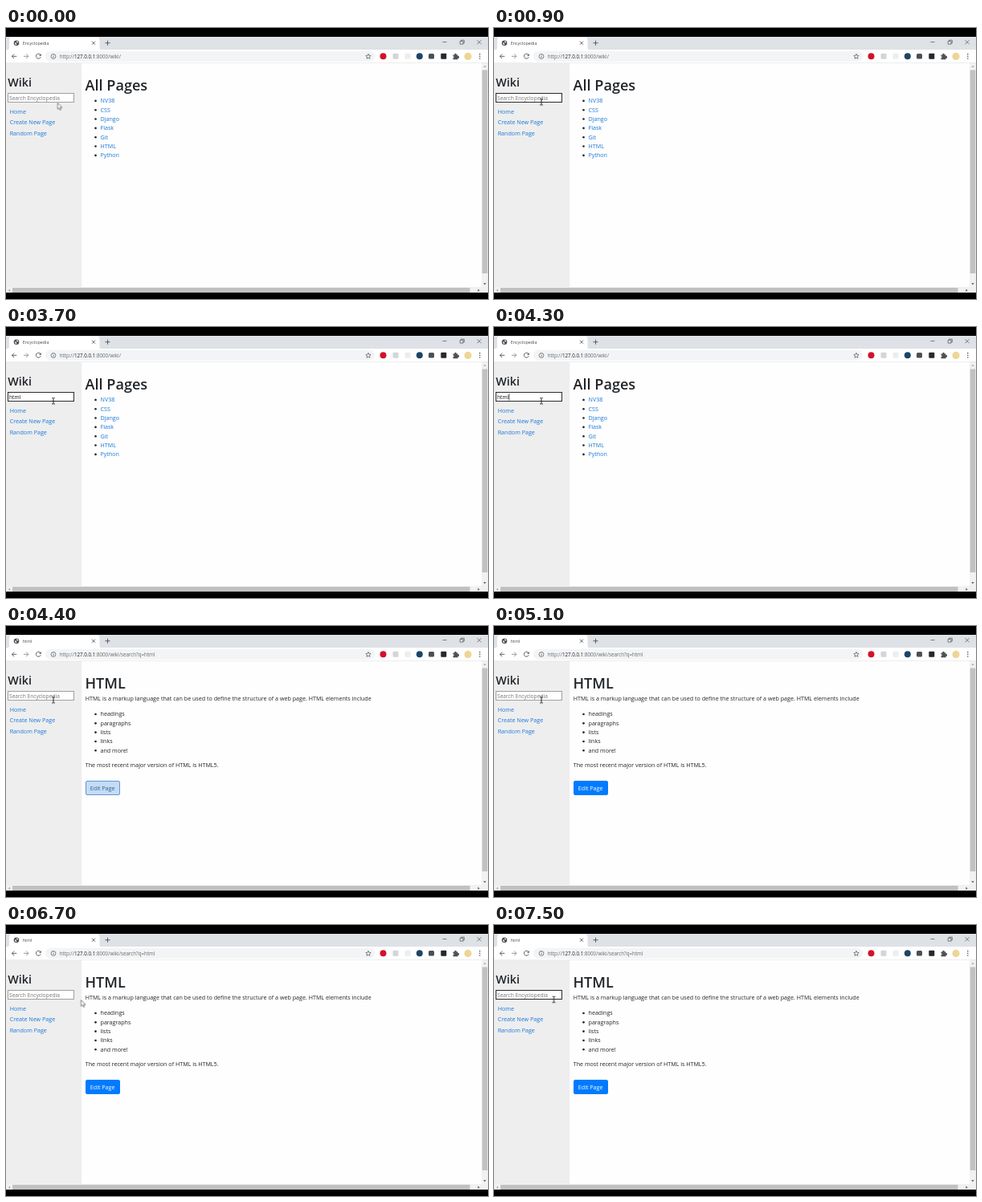
An HTML page that plays this animation: 600 by 338 pixels, repeating every 8000 ms.

```html
<!DOCTYPE html>
<html lang="en">
<head>
<meta charset="utf-8">
<title>Encyclopedia</title>
<style>
html, body { margin: 0; width: 100%; height: 100%; overflow: hidden; background: #000; }
svg { display: block; width: 600px; height: 338px; }
text { font: 7.15px "Open Sans", "Noto Sans", sans-serif; fill: #212529; white-space: pre; }
.h1 { font-size: 18.1px; font-weight: 600; }
.h2 { font-size: 14.3px; font-weight: 600; }
.link text, text.link { fill: #1a78d8; }
.ui { font-size: 5.4px; fill: #45494d; }
.url { font-size: 6.22px; fill: #202124; }
.url .dim { fill: #64696d; }
.field { font-size: 6.63px; fill: #111; }
.hint { fill: #757575; }
.line { fill: none; stroke: #4d5156; stroke-width: .9; }
.thin { stroke-width: .7; }

/* One 8 s timeline; every change is a hard step. */
.a { animation: 8s step-end infinite; }
.old { animation-name: old; }
.new { animation-name: new; }
.focus { animation-name: focus; }
.hint { animation-name: hint; }
.k1 { animation-name: k1; }
.k2 { animation-name: k2; }
.k3 { animation-name: k3; }
.k4 { animation-name: k4; }
.caret { animation-name: blink, caret; }
.btn { animation-name: btn; }
.label { animation-name: label; }
.mouse { animation-name: move; }
.arrow { animation-name: arrow; }
.beam { animation-name: beam; }

@keyframes old { 0% { visibility: visible } 55%, 100% { visibility: hidden } }
@keyframes new { 0% { visibility: hidden } 55%, 100% { visibility: visible } }
@keyframes focus {
  0%, 55% { visibility: hidden }
  5%, 87.5%, 100% { visibility: visible }
}
@keyframes hint { 0%, 55%, 100% { visibility: visible } 30% { visibility: hidden } }
@keyframes k1 { 0%, 55%, 100% { visibility: hidden } 30% { visibility: visible } }
@keyframes k2 { 0%, 55%, 100% { visibility: hidden } 32.5% { visibility: visible } }
@keyframes k3 { 0%, 55%, 100% { visibility: hidden } 36.25% { visibility: visible } }
@keyframes k4 { 0%, 55%, 100% { visibility: hidden } 40% { visibility: visible } }
@keyframes blink {
  0%, 11.25%, 25%, 46.25%, 55%, 93.75%, 100% { visibility: hidden }
  5%, 18.75%, 30%, 52.5%, 87.5% { visibility: visible }
}
@keyframes caret {
  0%, 55%, 100% { transform: translateX(4.2px) }
  30% { transform: translateX(8.4px) }
  32.5% { transform: translateX(10.8px) }
  36.25% { transform: translateX(16.9px) }
  40% { transform: translateX(18.4px) }
}
@keyframes btn {
  0%, 55% { fill: #c5dcf4; stroke: #5f97d6 }
  56.25%, 100% { fill: #007bff; stroke: #007bff }
}
@keyframes label { 0%, 55% { fill: #2f5f98 } 56.25%, 100% { fill: #fff } }
@keyframes move {
  0% { transform: translate(64.3px, 93.5px) }
  1.25% { transform: translate(61.5px, 93px) }
  2.5% { transform: translate(59px, 92.2px) }
  70% { transform: translate(59px, 92.2px); animation-timing-function: steps(5, start) }
  75%, 77.5% { transform: translate(131.5px, 95px) }
  80% { transform: translate(131.5px, 95px); animation-timing-function: steps(6, start) }
  87.5%, 100% { transform: translate(74.5px, 92.9px) }
}
@keyframes arrow {
  0%, 71.25% { visibility: visible }
  2.5%, 85%, 100% { visibility: hidden }
}
@keyframes beam {
  0%, 71.25% { visibility: hidden }
  2.5%, 85%, 100% { visibility: visible }
}
</style>
</head>
<body>
<svg viewBox="0 0 600 338">
  <rect width="600" height="338"/>

  <!-- tab strip -->
  <rect y="11" width="600" height="17" fill="#dee1e6"/>
  <path d="M1 27.5q3 0 3-3V15q0-3.500 3.500-3.500H113q3.500 0 3.500 3.500v9.500q0 3 3 3z" fill="#fff"/>
  <circle cx="13" cy="18.700" r="3.300" fill="#4d5156"/>
  <path d="M10.800 18.200l2 .6.300 1.600-1 .8zM13.500 16.200l1.700 1-.6 1.200-1.500-.6z" fill="#fff"/>
  <text class="ui a old" x="20.700" y="20.700">Encyclopedia</text>
  <text class="ui a new" x="20.700" y="20.700">html</text>
  <path class="line" d="M107 16.700l4 4m0-4l-4 4M123.500 18.700h6m-3-3v6"/>
  <path class="line thin" d="M543.500 17.500h5M565.200 16.300h3.800v3.800h-3.800zM566.500 16.300v-1.200h3.800v3.800h-1.300M586.500 15.200l5 5m0-5l-5 5"/>

  <!-- toolbar -->
  <rect y="27" width="600" height="17" fill="#fff"/>
  <rect x="49" y="28.700" width="410" height="13" rx="6.500" fill="#f3f4f5"/>
  <path class="line" d="M13.300 35.300H7.500m2.700-2.800l-2.800 2.800 2.800 2.800M43 33.700A3 3 0 1 0 43.200 36.200"/>
  <path d="M43.700 32v2.700h-2.700z" fill="#4d5156"/>
  <path class="line" style="stroke:#8a8d91" d="M22 35.300h5.800m-2.700-2.800l2.800 2.800-2.800 2.800"/>
  <g class="line thin">
    <circle cx="59" cy="35.400" r="2.900"/>
    <path d="M59 35v2M59 33.500v.8"/>
    <path d="M451 32.200l.9 2.100 2.300.2-1.700 1.500.5 2.300-2-1.200-2 1.200.5-2.300-1.700-1.500 2.300-.2z"/>
  </g>
  <text class="url" x="66.700" y="37.600"><tspan class="dim">http://</tspan>127.0.0.1<tspan class="dim">:8000/wiki/<tspan class="a new">search?q=html</tspan></tspan></text>
  <circle cx="469.500" cy="35.300" r="4" fill="#d3122a"/>
  <rect x="481.500" y="31.800" width="7" height="7" rx="1" fill="#d4d5d6"/>
  <rect x="496.500" y="31.800" width="7" height="7" rx="1" fill="#eceded"/>
  <circle cx="514.800" cy="35.300" r="4" fill="#1d4566"/>
  <rect x="526" y="32" width="7" height="6.500" rx="1.500" fill="#4b4f54"/>
  <rect x="541.300" y="31.800" width="7" height="7" rx="1" fill="#26282a"/>
  <path d="M556.500 33.500h1.800a1.300 1.300 0 1 1 2.500 0h1.700v1.700a1.300 1.300 0 1 1 0 2.500v1.500h-6v-1.800a1.100 1.100 0 1 0 0-2.200z" fill="#4d5156"/>
  <circle cx="575" cy="35.400" r="4.600" fill="#eed596"/>
  <g fill="#4d5156">
    <circle cx="589.800" cy="32.600" r=".8"/><circle cx="589.800" cy="35.300" r=".8"/><circle cx="589.800" cy="38" r=".8"/>
  </g>
  <rect y="43" width="600" height=".7" fill="#d9dbde"/>

  <!-- page -->
  <rect y="43.700" width="592" height="280" fill="#fefefe"/>
  <rect y="43.700" width="94.300" height="280" fill="#eee"/>
  <text class="h2" x="2.300" y="73.300">Wiki</text>
  <rect x="2.500" y="81.500" width="82" height="11" fill="#fff" stroke="#a0a0a0"/>
  <rect class="a focus" x="2.500" y="81.500" width="82" height="11" fill="#fff" stroke="#2b2b2b"/>
  <text class="field a hint" x="4" y="89.800">Search Encyclopedia</text>
  <text class="field" x="4" y="89.800"><tspan class="a k1">h</tspan><tspan class="a k2">t</tspan><tspan class="a k3">m</tspan><tspan class="a k4">l</tspan></text>
  <rect class="a caret" y="83" width=".7" height="8.500" fill="#111"/>
  <g class="link">
    <text x="4.700" y="106.700">Home</text>
    <text x="4.700" y="120.400">Create New Page</text>
    <text x="4.700" y="134">Random Page</text>
  </g>

  <g class="a old">
    <text class="h1" x="98.500" y="77.500">All Pages</text>
    <g id="pages"></g>
  </g>
  <g class="a new">
    <text class="h1" x="98.500" y="77.500">HTML</text>
    <text x="98.700" y="93.300">HTML is a markup language that can be used to define the structure of a web page. HTML elements include</text>
    <g id="parts"></g>
    <text x="98.700" y="176.200">The most recent major version of HTML is HTML5.</text>
    <rect class="a btn" x="99.500" y="193.500" width="42" height="17" rx="1.500"/>
    <text class="a label" x="104.800" y="204.800">Edit Page</text>
  </g>

  <!-- scrollbars -->
  <path d="M592 43.700h8V330H0v-7h592z" fill="#f1f1f1"/>
  <path d="M592.700 52.500h6.600V306h-6.600zM8 324h569.500v6H8z" fill="#c1c1c1"/>
  <path d="M594.300 48.800l1.700-2 1.700 2zM5 325.600l-2 1.700 2 1.700z" fill="#a3a3a3"/>
  <path d="M594.300 318.300l1.700 2 1.700-2zM587.500 325.600l2 1.700-2 1.700z" fill="#505050"/>

  <g class="a mouse">
    <path class="a arrow" d="M0 0v7.800l1.800-1.700 1.200 2.700 1.300-.6-1.200-2.600h2.500z" fill="#fff" stroke="#333" stroke-width=".6"/>
    <path class="a beam" d="M-1.800-3.800H-.5L0-3.300.5-3.800H1.800M0-3.300V3.300M-1.800 3.800H-.5L0 3.300.5 3.800H1.800" fill="none" stroke="#222"/>
  </g>
</svg>
<script>
const bullets = (id, top, items, cls = "") => {
  document.getElementById(id).innerHTML = items.map((item, i) => {
    const y = top + i * 11.33;
    return `<circle cx="111.500" cy="${y - 2.4}" r="1.300" fill="#212529"/>
      <text class="${cls}" x="117.500" y="${y}">${item}</text>`;
  }).join("");
};
bullets("pages", 93.3, ["NV38", "CSS", "Django", "Flask", "Git", "HTML", "Python"], "link");
bullets("parts", 112.4, ["headings", "paragraphs", "lists", "links", "and more!"]);
</script>
</body>
</html>
```
